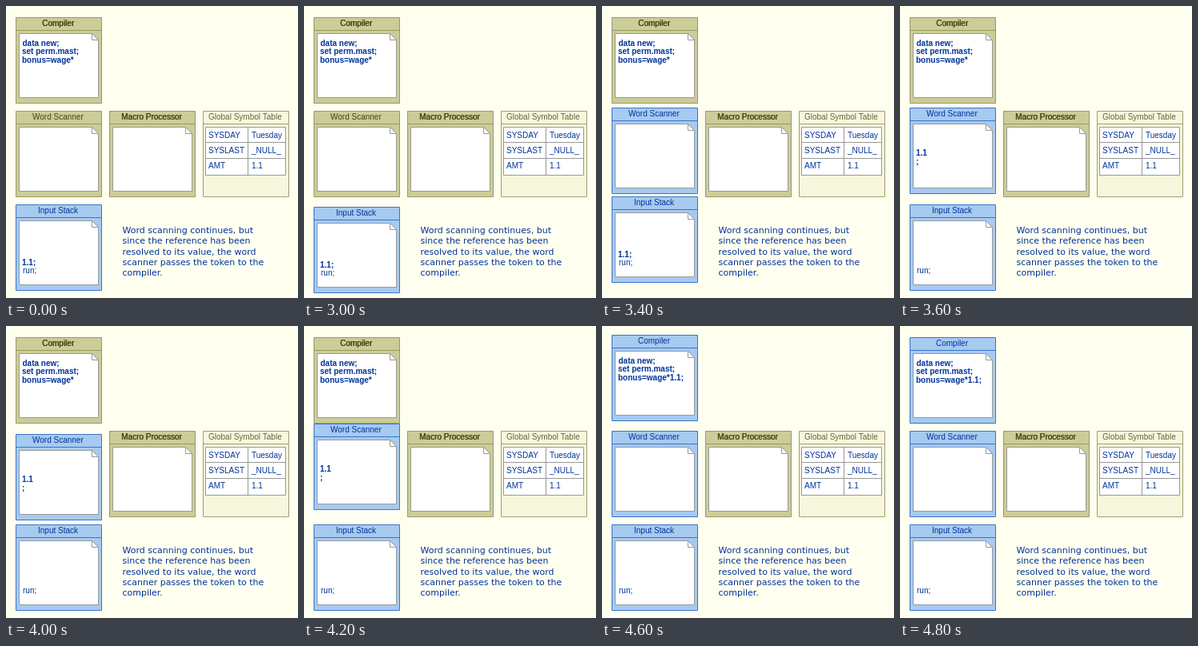
Animation of 365 by 365 pixels, one loop 5000 ms. Source, as an HTML page with a canvas:

```html
<!DOCTYPE html>
<html lang="en">
<head>
<meta charset="utf-8">
<title>Word scanning</title>
<style>
  html, body { margin: 0; width: 100%; height: 100%; overflow: hidden; background: #fffff0; }
  canvas { display: block; }
</style>
</head>
<body>
<canvas id="stage" width="365" height="365"></canvas>
<script>
const ctx = document.getElementById('stage').getContext('2d');
const LOOP = 5000;
const INK = '#003399';
const GREY = '#999999';
const ARIAL = '10px "Liberation Sans", Arial, sans-serif';
const BOLD = 'bold ' + ARIAL;
const VERDANA = '11px "DejaVu Sans", Verdana, sans-serif';

const OLIVE = { fill: '#cccc99', edge: '#999966', title: '#444411' };
const BLUE = { fill: '#a6caf0', edge: '#3a74cc', title: INK };
const PALE = { fill: '#f7f7de', edge: '#a0a070', title: '#666633' };

const NOTE = [
  'Word scanning continues, but',
  'since the reference has been',
  'resolved to its value, the word',
  'scanner passes the token to the',
  'compiler.'
];
const SYMBOLS = [['SYSDAY', 'Tuesday'], ['SYSLAST', '_NULL_'], ['AMT', '1.1']];

// Latest value whose start time has been reached.
const at = (t, steps) => steps.filter(([start]) => t >= start).pop()[1];

function text(str, x, y, font = ARIAL, color = INK) {
  ctx.font = font;
  ctx.fillStyle = color;
  ctx.fillText(str, x, y);
}

function path(points, stroke, fill, closed = true) {
  ctx.beginPath();
  points.forEach(([x, y]) => ctx.lineTo(x + 0.5, y + 0.5));
  if (closed) ctx.closePath();
  if (fill) {
    ctx.fillStyle = fill;
    ctx.fill();
  }
  ctx.strokeStyle = stroke;
  ctx.stroke();
}

function box(x, y, w, h, stroke, fill) {
  path([[x, y], [x + w, y], [x + w, y + h], [x, y + h]], stroke, fill);
}

function line(x1, y1, x2, y2, stroke) {
  path([[x1, y1], [x2, y2]], stroke, null, false);
}

function frame(x, y, title, titleX, theme, heavy) {
  box(x, y, 107, 107, theme.edge, theme.fill);
  line(x, y + 16, x + 107, y + 16, theme.edge);
  text(title, titleX, y + 11, ARIAL, theme.title);
  if (heavy) text(title, titleX + 0.5, y + 11, ARIAL, theme.title);
}

function page(x, y) {
  const left = x + 4, right = x + 103, top = y + 20, bottom = y + 100, fold = 8;
  path([[left, top], [right - fold, top], [right, top + fold], [right, bottom], [left, bottom]],
    GREY, '#ffffff');
  path([[right - fold, top], [right - fold, top + fold], [right, top + fold]], GREY, null, false);
}

function panel(x, y, ...rest) {
  frame(x, y, ...rest);
  page(x, y);
}

function compiler(t) {
  const active = t >= 4400;
  const y = at(t, [[0, 14], [4400, 11], [4800, 14]]);
  panel(12, y, 'Compiler', 45, active ? BLUE : OLIVE, !active);
  text('data new;', 20.5, y + 36, BOLD);
  text('set perm.mast;', 20, y + 46, BOLD);
  text(t >= 4600 ? 'bonus=wage*1.1;' : 'bonus=wage*', 20, y + 57, BOLD);
}

function scanner(t) {
  const y = at(t, [[0, 131], [3400, 127], [3800, 131], [4000, 135], [4200, 122], [4600, 131]]);
  panel(12, y, 'Word Scanner', 33, t >= 3200 ? BLUE : OLIVE);
  if (t >= 3600 && t < 4600) {
    text('1.1', 20, y + 60, BOLD);
    text(';', 20, y + 71, BOLD);
  }
}

function inputStack(t) {
  const y = at(t, [[0, 248], [3000, 251], [3200, 238], [3600, 248]]);
  panel(12, y, 'Input Stack', 40, BLUE);
  if (t < 3600) text('1.1;', 20, y + 76, BOLD);
  text('run;', 21, y + 86);
}

function symbolTable() {
  frame(246, 131, 'Global Symbol Table', 253, PALE);
  box(249, 151, 100, 60, GREY, '#ffffff');
  line(302, 151, 302, 211, GREY);
  [170, 190].forEach(y => line(249, y, 349, y, GREY));
  SYMBOLS.forEach(([name, value], i) => {
    const y = Math.round(164.5 + 19 * i);
    text(name, 253, y);
    text(value, 307, y);
  });
}

function draw(t) {
  ctx.fillStyle = '#fffff0';
  ctx.fillRect(0, 0, 365, 365);
  ctx.lineWidth = 1;
  compiler(t);
  scanner(t);
  panel(129, 131, 'Macro Processor', 144, OLIVE, true);
  symbolTable();
  inputStack(t);
  NOTE.forEach((str, i) => text(str, 145.5, Math.round(284 + 13.3 * i), VERDANA));
}

const begin = performance.now();
function tick() {
  draw((performance.now() - begin) % LOOP);
  requestAnimationFrame(tick);
}
tick();
</script>
</body>
</html>
```
